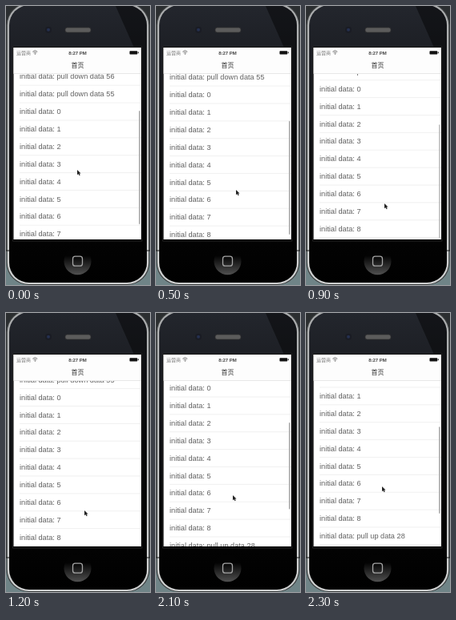
Write an HTML page that moves like this. It is 180x349 px and loops after 2400 ms.

```html
<!DOCTYPE html>
<html>
<head>
<meta charset="utf-8">
<style>
html, body { margin: 0; width: 100%; height: 100%; overflow: hidden; background: #2b2e30; }
svg { display: block; width: 180px; height: 349px; }
text { font-family: "Liberation Sans", Arial, sans-serif; }
.cjk { font-family: "Noto Sans CJK SC", "Noto Sans CJK", sans-serif; }
#rows text { font-size: 9.2px; fill: #606060; }
</style>
</head>
<body>
<svg viewBox="0 0 180 349">
  <defs>
    <linearGradient id="glass" x2="0" y2="1">
      <stop offset="0" stop-color="#23262d"/><stop offset=".2" stop-color="#1b1d22"/>
      <stop offset=".8" stop-color="#040404"/><stop offset="1" stop-color="#000"/>
    </linearGradient>
    <linearGradient id="rim" x2="0" y2="1">
      <stop offset="0" stop-color="#a9abac"/><stop offset="1" stop-color="#cfd1d1"/>
    </linearGradient>
    <linearGradient id="button" x2="0" y2="1">
      <stop offset=".3" stop-color="#030303"/><stop offset="1" stop-color="#505050"/>
    </linearGradient>
    <clipPath id="list"><rect x="9.5" y="85" width="159.5" height="207"/></clipPath>
    <clipPath id="face"><rect x="4" y="-1" width="172" height="347" rx="25"/></clipPath>
  </defs>

  <rect width="180" height="306" fill="#2b2e30"/>
  <rect y="306" width="180" height="43" fill="#6f8487"/>
  <rect x=".5" y="-4" width="179" height="353" rx="28" fill="#3c3f40"/>
  <rect x="1.7" y="-3" width="176.6" height="351" rx="27" fill="url(#rim)"/>
  <path d="M0 306H4M176 306H180" stroke="#151515"/>
  <g clip-path="url(#face)">
    <rect width="180" height="349" fill="url(#glass)"/>
    <path d="M137 0H180V349H170V52H160Z" fill="#000" opacity=".45"/>
  </g>
  <rect x="74" y="27" width="32" height="6" rx="2.5" fill="#5c5c5c" stroke="#303030" stroke-width=".8"/>
  <circle cx="53" cy="29.7" r="4" fill="#1a1c24"/>
  <circle cx="53" cy="29.7" r="2" fill="#25304f"/>
  <circle cx="89.5" cy="319.2" r="17" fill="url(#button)"/>
  <rect x="83.5" y="313.2" width="12" height="12" rx="3" fill="none" stroke="#a5a5a5" stroke-width="1.3"/>

  <rect x="8.5" y="51" width="161.5" height="243" fill="#000" stroke="#2c2c2c" stroke-width=".7"/>
  <rect x="9.5" y="52" width="159.5" height="240" fill="#fff"/>
  <g clip-path="url(#list)">
    <g id="rows"></g>
    <rect id="bar" x="166" width="1.8" rx=".9" fill="#b4b4b4"/>
  </g>

  <rect x="9.5" y="52" width="159.5" height="32.5" fill="#fdfdfd"/>
  <path d="M9.5 84.5H169" stroke="#d8d8d8" stroke-width=".6"/>
  <text class="cjk" x="13" y="60.5" font-size="6" fill="#777">运营商</text>
  <g fill="none" stroke="#666" stroke-width=".9">
    <path d="M33.3 57.2Q36.3 54.4 39.3 57.2M34.5 58.7Q36.3 57 38.1 58.7"/>
    <circle cx="36.3" cy="60" r=".4"/>
  </g>
  <text x="89.5" y="60.5" font-size="6" font-weight="bold" fill="#444" text-anchor="middle">8:27 PM</text>
  <rect x="154.5" y="56.2" width="9.8" height="4.2" rx=".7" fill="#111"/>
  <rect x="164.8" y="57.4" width="1" height="1.8" fill="#111"/>
  <text class="cjk" x="89.5" y="77" font-size="8" fill="#333" text-anchor="middle">首页</text>

  <path id="cursor" d="M0 0V6.2L1.5 4.9L2.6 7.2L3.7 6.6L2.7 4.5H4.6Z" fill="#222"/>
</svg>
<script>
const LOOP = 2400, STEP = 100, PITCH = 21.88;
const el = id => document.getElementById(id);

// time, centre of row 0, cursor x, cursor y
const keys = [
  [0, 132, 89, 205], [299, 132, 89, 205],
  [300, 128, 102, 204], [400, 119, 101, 216], [500, 111, 100, 230],
  [600, 105.6, 99, 241], [700, 103, 98, 247], [800, 102.7, 98, 247],
  [1000, 104.6, 98, 247], [1200, 105.5, 98, 247], [1800, 105.5, 98, 247],
  [1900, 105.5, 98, 242], [2100, 94, 96, 228], [2300, 82, 95, 217]
];

function pose(t) {
  const i = keys.findIndex(k => k[0] > t);
  if (i < 0) return keys[keys.length - 1];
  const a = keys[i - 1], b = keys[i], p = (t - a[0]) / (b[0] - a[0]);
  return a.map((v, n) => v + (b[n] - v) * p);
}

const label = i => i < 0 ? "pull down data " + (54 - i) : i > 8 ? "pull up data " + (19 + i) : i;
let rows = "";
for (let i = -3; i < 11; i++) {
  const y = i * PITCH;
  rows += `<text x="17" y="${y + 3.2}">initial data: ${label(i)}</text>
    <path d="M17 ${y + PITCH / 2}H169" stroke="#e6e6e6" stroke-width=".6"/>`;
}
el("rows").innerHTML = rows;

function draw(now) {
  const t = Math.floor(now % LOOP / STEP) * STEP;
  const [, y, x, cy] = pose(t);
  el("rows").setAttribute("transform", `translate(0 ${y})`);
  el("cursor").setAttribute("transform", `translate(${x} ${cy})`);

  const grown = t >= 1900;
  const top = grown ? 137 + (94 - y) * .44 : 131 + (132 - y) * .61;
  const bottom = Math.min(290.5, top + (grown ? 108.5 : 142));
  el("bar").setAttribute("y", top);
  el("bar").setAttribute("height", bottom - top);
  el("bar").setAttribute("opacity", grown ? +(t > 1900) : Math.max(0, Math.min(1, (1200 - t) / 400)));
  requestAnimationFrame(draw);
}
draw(performance.now());
</script>
</body>
</html>
```
